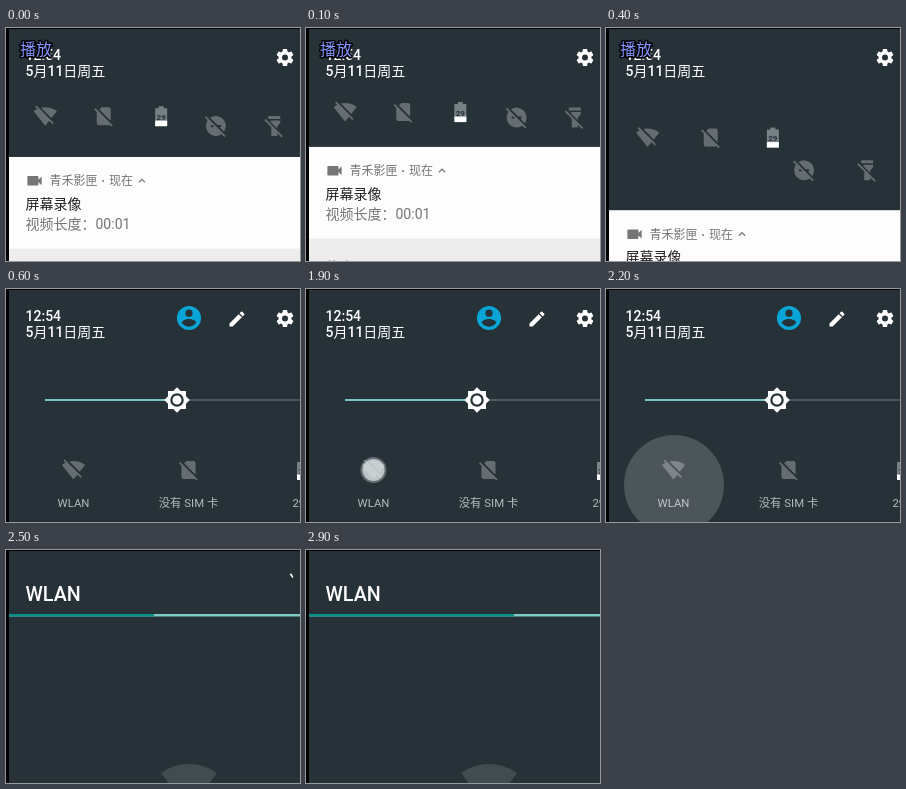
Recreate the animation shown at these times as an HTML page with a canvas. Size 294 by 233 pixels, loop 3 s.

```html
<!DOCTYPE html>
<html lang="zh">
<head>
<meta charset="utf-8">
<style>
html, body { margin: 0; width: 100%; height: 100%; overflow: hidden; background: #000; }
canvas { display: block; }
</style>
</head>
<body>
<canvas id="stage" width="294" height="233"></canvas>
<script>
const W = 294, H = 233, LOOP = 3000, STEP = 100;
const PANEL = '#263238', DIM = 'rgba(255,255,255,.29)', GREY = '#757575';
const c = document.getElementById('stage').getContext('2d');

// Icons on a 24-unit grid
const ICON = {
  gear: 'M19.43 12.98c.04-.32.07-.64.07-.98s-.03-.66-.07-.98l2.11-1.65c.19-.15.24-.42.12-.64l-2-3.46c-.12-.22-.39-.3-.61-.22l-2.49 1c-.52-.4-1.08-.73-1.69-.98l-.38-2.65C14.46 2.18 14.25 2 14 2h-4c-.25 0-.46.18-.49.42l-.38 2.65c-.61.25-1.17.59-1.69.98l-2.49-1c-.23-.09-.49 0-.61.22l-2 3.46c-.13.22-.07.49.12.64l2.11 1.65c-.04.32-.07.65-.07.98s.03.66.07.98l-2.11 1.65c-.19.15-.24.42-.12.64l2 3.46c.12.22.39.3.61.22l2.49-1c.52.4 1.08.73 1.69.98l.38 2.65c.03.24.24.42.49.42h4c.25 0 .46-.18.49-.42l.38-2.65c.61-.25 1.17-.59 1.69-.98l2.49 1c.23.09.49 0 .61-.22l2-3.46c.12-.22.07-.49-.12-.64zM12 15.5a3.5 3.5 0 1 1 0-7 3.5 3.5 0 0 1 0 7z',
  pencil: 'M3 17.25V21h3.75L17.81 9.94l-3.75-3.75zM20.71 7.04a1 1 0 0 0 0-1.41l-2.34-2.34a1 1 0 0 0-1.41 0l-1.83 1.83 3.75 3.75z',
  user: 'M12 2a10 10 0 1 0 0 20 10 10 0 0 0 0-20zm0 3a3 3 0 1 1 0 6 3 3 0 0 1 0-6zm0 14.2c-2.5 0-4.71-1.28-6-3.22.03-1.99 4-3.08 6-3.08s5.97 1.09 6 3.08c-1.29 1.94-3.5 3.22-6 3.22z',
  sun: 'M20 8.69V4h-4.69L12 .69 8.69 4H4v4.69L.69 12 4 15.31V20h4.69L12 23.31 15.31 20H20v-4.69L23.31 12zM12 18a6 6 0 1 1 0-12 6 6 0 0 1 0 12zM12 8a4 4 0 1 0 0 8 4 4 0 0 0 0-8z',
  wifiOff: 'M23.64 7C23.19 6.66 18.71 3 12 3c-1.5 0-2.89.19-4.15.48L18.18 13.8zM17.04 15.22L3.27 1.44 2 2.72l2.05 2.06C1.91 5.76.59 6.82.36 7L12 21.5l3.91-4.87 3.32 3.32 1.27-1.27z',
  simOff: 'M19 5a2 2 0 0 0-2-2h-7L7.66 5.34 19 16.68zM3.65 3.88L2.38 5.15 5 7.77V19a2 2 0 0 0 2 2h10c.35 0 .67-.1.96-.26l1.88 1.88 1.27-1.27z',
  quietOff: 'M17 11v2h-1.46l4.68 4.68A10 10 0 0 0 6.32 3.78L13.54 11zM2.27 2.27L1 3.54l2.78 2.78a10 10 0 0 0 13.9 13.9L20.46 23l1.27-1.27zM7 13v-2h1.46l2 2z',
  torchOff: 'M6 2h12v3H6zM9 6.5h9v2l-3 4v2.2L7.8 7.5zM3.3 5L2 6.3l7 7V22h6v-2.7l4.2 4.2 1.3-1.3z',
  battery: 'M9.5 2h5v2H18v18H6V4h3.5z',
  camera: 'M17 10.5V7a1 1 0 0 0-1-1H4a1 1 0 0 0-1 1v10a1 1 0 0 0 1 1h12a1 1 0 0 0 1-1v-3.5l4 4v-11z',
  chevron: 'M12 8l-6 6 1.41 1.41L12 10.83l4.59 4.58L18 14z'
};
for (const k in ICON) ICON[k] = new Path2D(ICON[k]);

// Quick tiles: icon, collapsed x, expanded x and y, label
const TILES = [
  ['wifiOff', 39, 67.5, 181, 'WLAN'],
  ['simOff', 97, 182.5, 181, '没有 SIM 卡'],
  ['battery', 154, 297, 181, '29%'],
  ['quietOff', 211, 67.5, 290, ''],
  ['torchOff', 269, 182.5, 290, '']
];

const mix = (a, b, k) => a + (b - a) * k;
const clamp = v => Math.max(0, Math.min(1, v));

// Piecewise linear value from [time, value] points
function track(t, ...keys) {
  let [t0, v0] = keys[0];
  for (const [t1, v1] of keys) {
    if (t <= t1) return t1 > t0 ? mix(v0, v1, clamp((t - t0) / (t1 - t0))) : v1;
    [t0, v0] = [t1, v1];
  }
  return v0;
}

function rect(x, y, w, h, color) {
  c.fillStyle = color;
  c.fillRect(x, y, w, h);
}

function disc(x, y, r, color) {
  c.beginPath();
  c.arc(x, y, r, 0, 7);
  c.fillStyle = color;
  c.fill();
}

function icon(name, x, y, size, color) {
  c.save();
  c.translate(x - size / 2, y - size / 2);
  c.scale(size / 24, size / 24);
  c.fillStyle = color;
  c.fill(ICON[name]);
  c.restore();
}

function text(s, x, y, size, color, weight = 400, align = 'left') {
  c.font = `${weight} ${size}px Roboto, "Noto Sans CJK SC", "Noto Sans CJK", sans-serif`;
  c.textAlign = align;
  c.fillStyle = color;
  c.fillText(s, x, y);
}

function notification(y) {
  rect(0, y, W, 92, '#fdfdfd');
  rect(0, y + 92, W, H, '#ededed');
  icon('camera', 28.5, y + 24, 19, GREY);
  text('青禾影匣', 43.5, y + 28.5, 12, GREY);
  text('·', 97, y + 28.5, 12, GREY, 700, 'center');
  text('现在', 103, y + 28.5, 12, GREY);
  icon('chevron', 136, y + 24, 14, GREY);
  text('屏幕录像', 19.5, y + 52, 14, '#212121');
  text('视频长度：00:01', 19.5, y + 72, 14, GREY);
  text('停止', 19.5, y + 125.5, 14, GREY, 500);
}

function tile([name, x0, x1, y1, label], open, fade) {
  const x = mix(x0, x1, open * open), y = mix(79, y1, open);
  icon(name, x, y, 24, name === 'battery' ? '#778085' : DIM);
  if (name === 'battery') {
    rect(x - 6, y + 4.5, 12, 5.5, '#fff');
    text('29', x, y + 3.5, 8, PANEL, 700, 'center');
  }
  c.globalAlpha = fade;
  text(label, x, y + 37, 11.4, '#b4babd', 400, 'center');
  c.globalAlpha = 1;
}

function panel(open) {
  const fade = clamp(open * 2 - 1);
  rect(0, 0, W, 106 + open * 254, PANEL);
  text('12:54', 19.5, 32, 14, '#fff', 500);
  text('5月11日周五', 19.5, 47.5, 14, '#fff', 500);
  icon('gear', 279, 29.5, 20.5, '#fff');
  c.globalAlpha = fade;
  icon('user', 183, 29, 29, '#08a5d6');
  icon('pencil', 231, 30, 20, '#fff');
  const y = mix(60, 111, open);
  rect(39, y - 1, 120, 2, '#76c6c4');
  rect(183, y - 1, W, 2, '#4d595e');
  icon('sun', 171, y, 27, '#fff');
  c.globalAlpha = 1;
  for (const t of TILES) tile(t, open, fade);
}

function touch(t) {
  const k = clamp((t - 1900) / 300);
  if (t > 1900) {
    const a = track(t, [2200, .17], [2300, .11], [2400, 0]);
    disc(mix(67, 68, k), mix(181, 196, k), mix(10, 50, k), `rgba(255,255,255,${a})`);
  }
  const dot = track(t, [1900, .72], [2000, .45], [2100, 0]);
  disc(67.5, 181, 13, `rgba(225,230,232,${dot * .45})`);
  disc(67.5, 181, 11, `rgba(225,230,232,${dot})`);
}

function detail(t) {
  const r = track(t, [2200, 0], [2300, 115], [2400, 218], [2500, 267.5], [2600, 400]);
  c.save();
  c.beginPath();
  c.arc(67, 181, r, 0, 7);
  c.clip();
  rect(0, 0, W, H, PANEL);
  text('WLAN', 19.5, 51, 19.7, '#fff', 500);
  rect(0, 64, W, 2.5, '#80cbc4');
  rect(0, 64, track(t, [2500, 148], [2900, 208]), 2.5, '#06908a');
  c.beginPath();
  c.moveTo(183, 262);
  c.arc(183, 262, 48, -Math.PI / 2 - .62, -Math.PI / 2 + .62);
  c.fillStyle = '#414c51';
  c.fill();
  c.restore();
}

function badge() {
  c.lineWidth = 3;
  c.lineJoin = 'round';
  c.strokeStyle = '#000';
  text('播放', 14, 27, 16, '#8593ff');
  c.strokeText('播放', 14, 27);
  c.fillText('播放', 14, 27);
}

function draw(now) {
  const t = Math.floor(now % LOOP / STEP) * STEP;
  const open = track(t, [0, .09], [100, .05], [200, .015], [300, 0], [400, .3], [500, .8], [600, 1]);
  notification(106 + open * 254);
  panel(open);
  if (t < 600) badge();
  if (t >= 1900) touch(t);
  if (t > 2200) detail(t);
  rect(0, 0, 3, H, '#000');
  rect(0, 0, W, 1, '#000');
}

let start;
function tick(now) {
  start ??= now;
  draw(now - start);
  requestAnimationFrame(tick);
}
draw(0);
requestAnimationFrame(tick);
</script>
</body>
</html>
```
